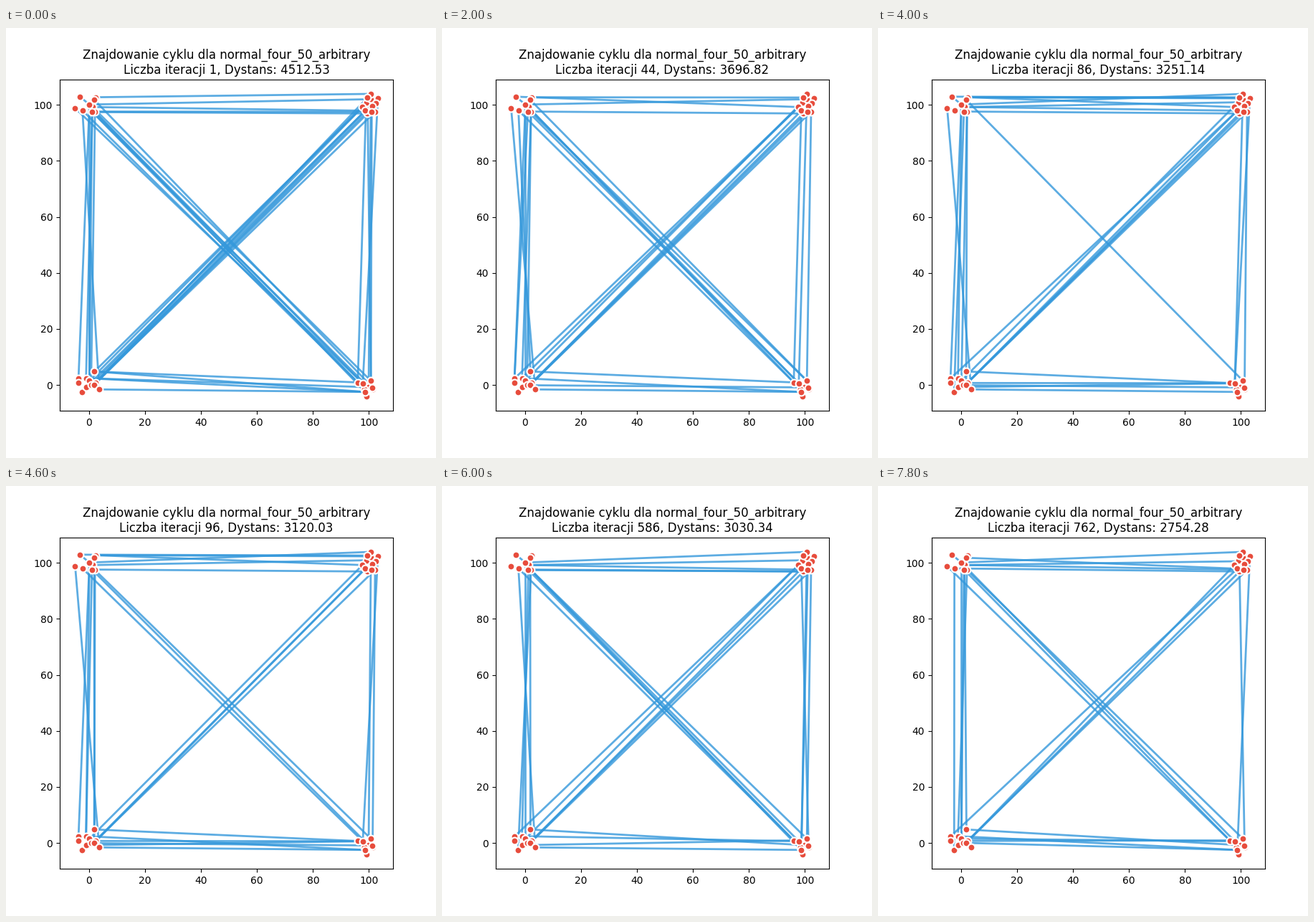
A matplotlib script that plays this animation: 600 by 600 pixels, repeating every 8 s.

```python
import random

import matplotlib.pyplot as plt
from matplotlib.animation import FuncAnimation
from matplotlib.collections import LineCollection

# Cities of the four corner clusters; each one is named by a letter.
UPPER_LEFT = [(2.4, 102.7), (1.8, 101.8), (1.2, 99.2), (-3.3, 102.9), (-5.0, 98.8),
              (-2.4, 98.0), (0.1, 100.1), (2.1, 97.4), (1.0, 97.6)]
UPPER_RIGHT = [(99.0, 100.9), (100.6, 102.0), (99.5, 96.9), (100.7, 103.9),
               (99.5, 102.6), (103.2, 102.3), (102.5, 100.6), (101.3, 99.5),
               (97.7, 99.2), (98.7, 97.9), (102.2, 97.5), (101.0, 97.5)]
LOWER_LEFT = [(2.2, 0.7), (-3.8, 2.3), (-3.8, 0.7), (-2.5, -2.6), (-1.1, 2.4),
              (0.1, 1.5), (-1.0, -0.8), (0.7, -0.1), (1.8, 0.0), (1.9, 4.8),
              (3.6, -1.6)]
LOWER_RIGHT = [(99.9, -0.8), (98.4, -1.5), (101.5, -1.6), (99.1, -4.1), (96.0, 0.9),
               (97.8, 0.6), (100.7, 1.5), (101.3, -0.9), (98.7, -2.5)]

CITIES = {}
for names, cluster in (("deiabcfhg", UPPER_LEFT), ("KLJABCDEFGIH", UPPER_RIGHT),
                       ("tjklmnopqrs", LOWER_LEFT), ("TUQSMNOPR", LOWER_RIGHT)):
    CITIES.update(zip(names, cluster))

LOCAL = "af bc jk lo ST"

# step, iteration, distance, long edges: top, left, bottom, right, both diagonals
STAGES = [
    (0, 1, 4512.53,
     "dA fL iG hJ gH  cs fj im fn gn hp  rM rR mT mR sR  MK NC TA OH OB "
     "cM bN gU hN iO hR gT eP  rF tG qJ pF nK qB tE tI oG"),
    (6, 29, 3839.14,
     "dF dK fA fD gI hJ  bs fj im hn fn  rM rR mR pP sR  MK NC OB "
     "cM cN gN hO iU eO  jF mG nK qF tJ qI tH"),
    (10, 44, 3696.82,
     "dB aF fL gJ  bs fj gj hm fn cr hp  rM mR pP sR  MG NA OI "
     "cM gN fN hO iU eO  jF mF nK qG tJ qI qH"),
    (16, 73, 3425.96,
     "dB fA fK iG gJ  cs fj gl im gr hn  rM mM nN pP sR  NA OC PI "
     "cM gN eO dN  jG nK qF tJ qI tH oG"),
    (23, 96, 3120.03,
     "aB dC dF fA iK gJ  bs fj fm gm er hq  rN tN mR oN sR pP  NC TA PI "
     "cN gT hO  nF qG tG tI"),
    (30, 586, 3030.34,
     "fA iK iI gJ hJ  cs hl im fn er  rT mN oM sR  RH RA GP OI "
     "cM hN hO gU hR  jF nF qG tJ qI"),
    (39, 762, 2754.28,
     "fA iD eG iI cJ  cl hm fn gn ir  rT mR nN tM qR  JP RC "
     "bM gU fN hO  jG qF tI qJ"),
]

STEPS = 40


def shuffled(edges, seed):
    edges = list(edges)
    random.Random(seed).shuffle(edges)
    return edges


def state(step):
    """Iteration, distance and edges, exchanging edges little by little."""
    k = max(i for i, s in enumerate(STAGES[:-1]) if s[0] <= step)
    (s0, it0, d0, e0), (s1, it1, d1, e1) = STAGES[k:k + 2]
    t = (step - s0) / (s1 - s0)
    old, new = e0.split(), e1.split()
    kept = [e for e in old if e in new]
    leaving = shuffled((e for e in old if e not in new), k)
    coming = shuffled((e for e in new if e not in old), k + 50)
    edges = (kept + leaving[round(t * len(leaving)):]
             + coming[:round(t * len(coming))])
    return round(it0 + t * (it1 - it0)), d0 + t * (d1 - d0), edges


fig, ax = plt.subplots(figsize=(6, 6), dpi=100)
ax.set_xlim(-10.5, 108.6)
ax.set_ylim(-9.2, 109.0)
ax.set_xticks(range(0, 101, 20))
ax.set_yticks(range(0, 101, 20))

lines = LineCollection([], colors="#3498db", linewidths=2, alpha=0.8, zorder=1)
ax.add_collection(lines, autolim=False)
ax.scatter(*zip(*CITIES.values()), s=50, c="#e74c3c", edgecolors="white",
           linewidths=1.5, zorder=2)
title = ax.set_title("")


def update(step):
    iteration, distance, edges = state(step)
    lines.set_segments([[CITIES[a], CITIES[b]] for a, b in edges + LOCAL.split()])
    title.set_text("Znajdowanie cyklu dla normal_four_50_arbitrary\n"
                   f"Liczba iteracji {iteration}, Dystans: {distance:.2f}")
    return lines, title


anim = FuncAnimation(fig, update, frames=STEPS, interval=200, repeat=True,
                     repeat_delay=0, blit=False)
plt.show()
```
